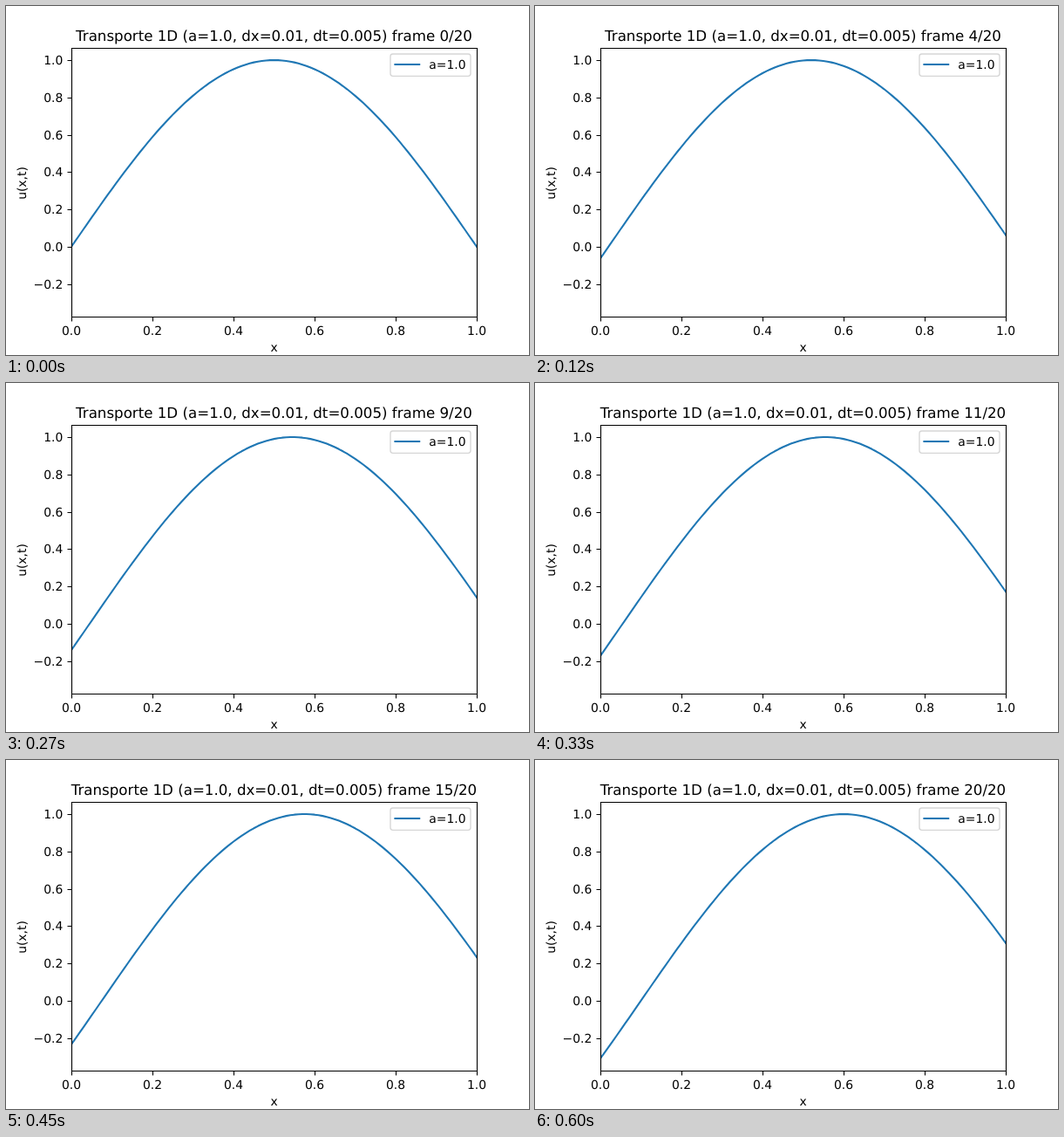
An HTML page for the animation above (630 ms loop, 600 by 400 pixels).

```html
<!DOCTYPE html>
<html lang="es">
<head>
<meta charset="utf-8">
<title>Transporte 1D</title>
<style>
  html, body { margin: 0; width: 100%; height: 100%; overflow: hidden; background: #fff; }
  svg { display: block; }
  text { font: 13.889px "DejaVu Sans", sans-serif; text-rendering: geometricPrecision; }
  .title { font-size: 16.667px; }
  .mid { text-anchor: middle; }
  .end { text-anchor: end; }
  .axis { fill: none; stroke: #000; stroke-width: 1.11; }
  .wave { fill: none; stroke: #1f77b4; stroke-width: 2.083; stroke-linecap: square; stroke-linejoin: round; }
  .box { fill: #fff; fill-opacity: .8; stroke: #ccc; stroke-opacity: .8; stroke-width: 1.389; }
</style>
</head>
<body>
<svg id="plot" width="600" height="400" viewBox="0 0 600 400">
  <clipPath id="area"><rect x="75" y="48" width="465" height="308"/></clipPath>
</svg>
<script>
const STEP_MS = 30, STEPS = 20, DT = 0.005;
const LEFT = 75, RIGHT = 540, TOP = 48, BOTTOM = 356;
const low = -Math.sin(Math.PI * STEPS * DT);
const pad = (1 - low) * 0.05;
const scaleY = (BOTTOM - TOP) / (1 - low + 2 * pad);
const px = x => LEFT + (RIGHT - LEFT) * x;
const py = u => BOTTOM - (u - low + pad) * scaleY;
const snap = v => Math.floor(v + 0.5) + 0.5;

const plot = document.getElementById('plot');

function add(tag, attrs, text = '') {
  const el = document.createElementNS('http://www.w3.org/2000/svg', tag);
  for (const key in attrs) el.setAttribute(key, attrs[key]);
  el.textContent = text;
  return plot.appendChild(el);
}

const wave = add('path', { class: 'wave', 'clip-path': 'url(#area)' });

// Ticks and their labels
let ticks = '';
for (let i = 0; i <= 5; i++) {
  const x = px(i / 5);
  ticks += `M${snap(x)} 356.5V361.5`;
  add('text', { class: 'mid', x, y: 377 }, (i / 5).toFixed(1));
}
for (let i = -1; i <= 5; i++) {
  const y = snap(py(i / 5));
  ticks += `M75.5 ${y}H70.5`;
  add('text', { class: 'end', x: 65.3, y: y + 4.5 }, (i / 5).toFixed(1).replace('-', '\u2212'));
}
add('path', { class: 'axis', d: ticks + 'M75.5 48.5H540.5V356.5H75.5Z' });

add('text', { class: 'mid', x: 307.5, y: 396 }, 'x');
add('text', { class: 'mid', transform: 'translate(23 203) rotate(-90)' }, 'u(x,t)');
const title = add('text', { class: 'title mid', x: 307.5, y: 40 });

// Legend
add('rect', { class: 'box', x: 441, y: 55, width: 92, height: 25.4, rx: 2.78 });
add('path', { class: 'wave', d: 'M446.4 67H474.2' });
add('text', { x: 485.3, y: 72 }, 'a=1.0');

let shown = -1;

function draw(time) {
  const n = Math.floor(time / STEP_MS) % (STEPS + 1);
  if (n === shown) return;
  shown = n;
  let d = '';
  for (let i = 0; i <= 100; i++) {
    const x = i / 100;
    d += `${i ? 'L' : 'M'}${px(x).toFixed(2)} ${py(Math.sin(Math.PI * (x - n * DT))).toFixed(2)}`;
  }
  wave.setAttribute('d', d);
  title.textContent = `Transporte 1D (a=1.0, dx=0.01, dt=0.005) frame ${n}/${STEPS}`;
}

function tick() {
  draw(performance.now());
  requestAnimationFrame(tick);
}
tick();
</script>
</body>
</html>
```
